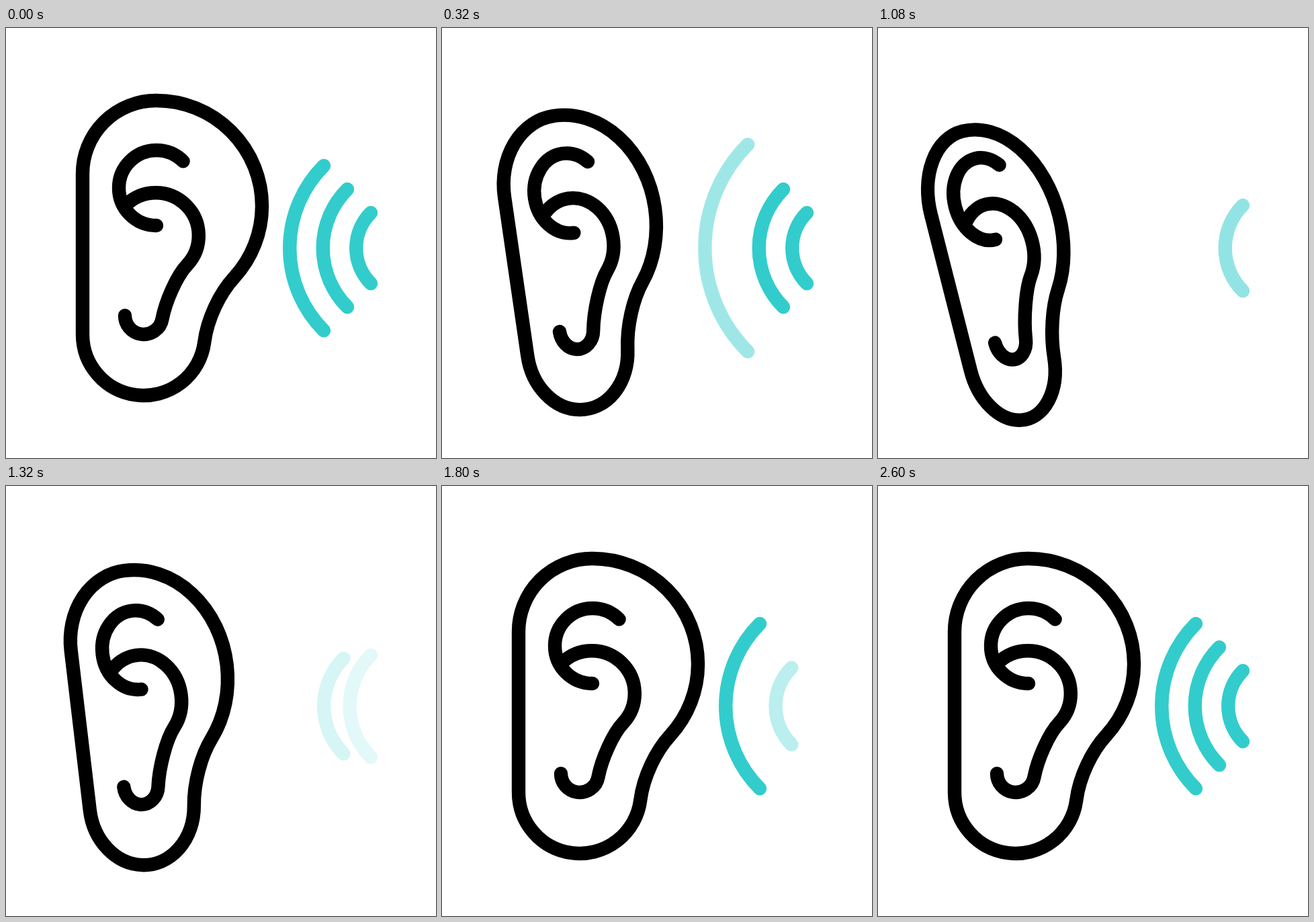
An HTML page with a canvas that plays this animation: 640x640 px, repeating every 2620 ms.

```html
<!DOCTYPE html>
<html lang="en">
<head>
<meta charset="utf-8">
<title>Listening ear</title>
<style>
  html, body { margin: 0; width: 100%; height: 100%; overflow: hidden; background: #fff; }
  canvas { display: block; width: 640px; height: 640px; }
</style>
</head>
<body>
<canvas id="stage" width="640" height="640"></canvas>
<script>
const ctx = document.getElementById('stage').getContext('2d');
const LOOP = 2620, STEP = 20, MOVE = 600;
const rad = degrees => degrees * Math.PI / 180;
const progress = (t, start) => Math.min(1, Math.max(0, (t - start) / MOVE));
const ease = x => x * x * (3 - 2 * x);

function arc(x, y, r, from, to, reverse = false) {
  ctx.arc(x, y, r, rad(from), rad(to), reverse);
}

// Only the path is transformed, so the line keeps its weight.
function strokePath(transform, build) {
  ctx.save();
  transform();
  ctx.beginPath();
  build();
  ctx.restore();
  ctx.stroke();
}

function outerEar() {
  ctx.moveTo(114, 456);
  arc(223, 217, 109, 180, 270);
  arc(224, 265, 157, -90, 42.5);
  ctx.bezierCurveTo(318, 394.6, 299.6, 433, 295.2, 468);
  arc(205, 456, 91, 7.5, 180);
  ctx.closePath();
}

function upperFold() {
  arc(224, 238, 56, -45, 90, true);
}

function lowerFold() {
  arc(223, 309, 63.8, -135, 43);
  ctx.bezierCurveTo(254, 369, 237.5, 407, 232.5, 433);
  arc(205, 428, 28, 10, 180);
}

// Tilts a part around its anchor while it shifts and stretches.
function tilt(p, anchorX, anchorY, shiftX, shiftY, growX, growY) {
  ctx.translate(anchorX + shiftX * p, anchorY + shiftY * p);
  ctx.rotate(rad(-15 * p));
  ctx.scale(1 + growX * p, 1 + growY * p);
  ctx.translate(-anchorX, -anchorY);
}

function drawEar(t) {
  const p = ease(progress(t, 0)) - ease(progress(t, 1000));
  const outerPose = () => tilt(p, 205, 547, 17, 37.2, -0.325, 0);
  const innerPose = () => tilt(p, 205, 400, -17, 34.4, -0.182, 0.116);
  ctx.strokeStyle = '#000';
  strokePath(outerPose, outerEar);
  strokePath(innerPose, upperFold);
  strokePath(innerPose, lowerFold);
}

// Each wave grows while fading out, then grows back in from a small size.
function drawWave(t, radius, leaveAt, returnAt) {
  const returning = t >= returnAt;
  const x = progress(t, returning ? returnAt : leaveAt);
  const size = returning ? 0.53 + 0.47 * ease(x) : 1 + 0.465 * ease(x);
  ctx.globalAlpha = returning ? x : 1 - x;
  ctx.strokeStyle = '#33cccc';
  strokePath(() => {
    ctx.translate(543, 327.6);
    ctx.scale(size, size);
  }, () => arc(52.7, 0, radius, 135, 225));
  ctx.globalAlpha = 1;
}

function draw(now) {
  const t = Math.floor((now % LOOP) / STEP) * STEP;
  ctx.fillStyle = '#fff';
  ctx.fillRect(0, 0, 640, 640);
  ctx.lineWidth = 20.4;
  ctx.lineCap = ctx.lineJoin = 'round';
  drawEar(t);
  drawWave(t, 173.5, 0, 1200);
  drawWave(t, 124, 400, 1600);
  drawWave(t, 74.5, 800, 2000);
}

const begin = performance.now();
function tick() {
  draw(performance.now() - begin);
  requestAnimationFrame(tick);
}
tick();
</script>
</body>
</html>
```
